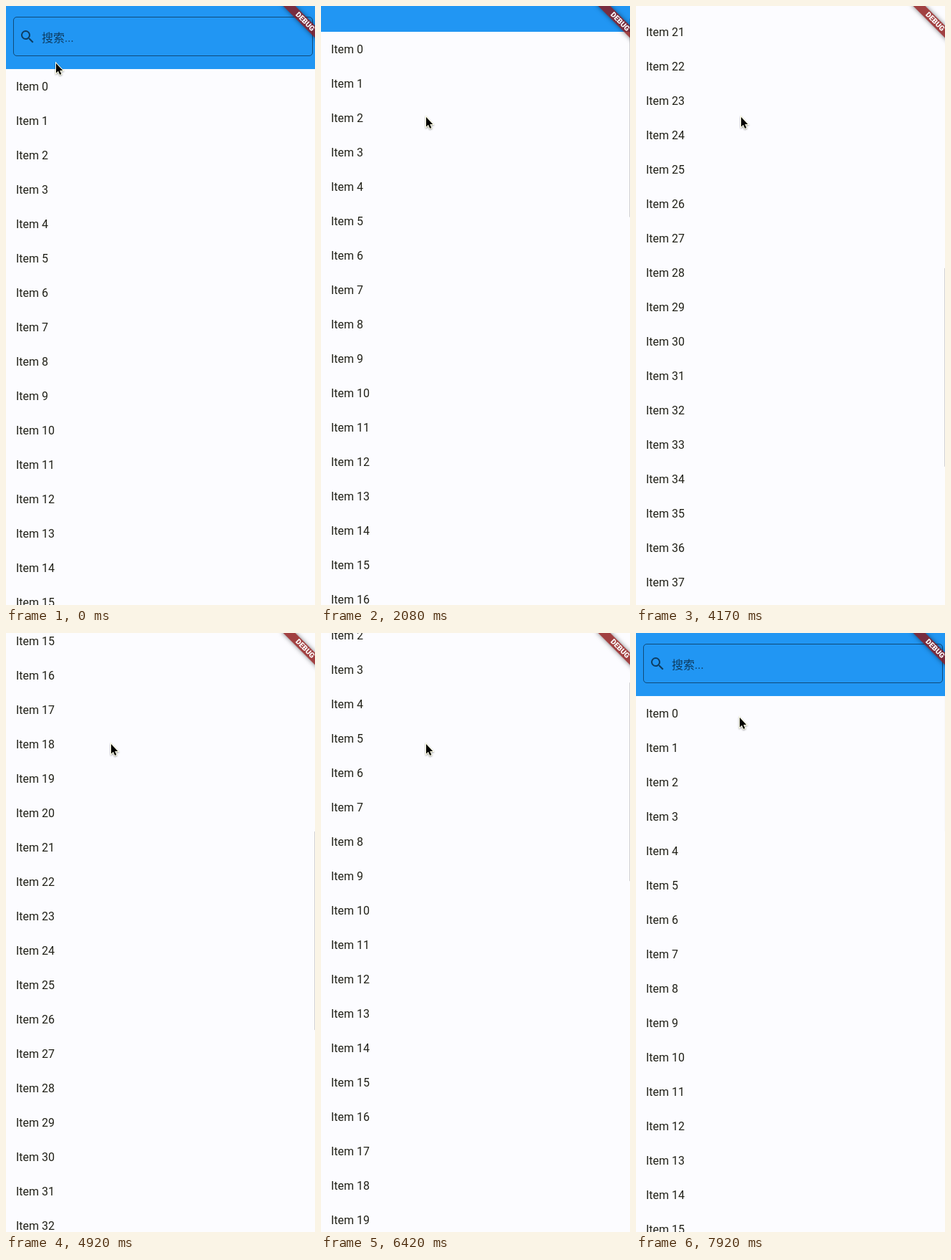
These frames come from a looping animation (432 px wide and 836 px high, 8 s). An HTML page:

```html
<!DOCTYPE html>
<html lang="zh">
<head>
<meta charset="utf-8">
<title>Collapsing search bar</title>
<style>
  html, body { margin: 0; width: 100%; height: 100%; overflow: hidden; background: #fcfcff; }
  #stage { position: relative; width: 432px; height: 836px; overflow: hidden;
    font: 16px Roboto, "Noto Sans CJK SC", "Noto Sans CJK", sans-serif; }
  #stage div, svg { position: absolute; }
  #list { top: 89px; left: 14px; color: #212118; will-change: transform; }
  #list p { margin: 0; height: 48px; line-height: 48px; white-space: nowrap; }
  #bar { top: 0; left: 0; width: 432px; overflow: hidden; background: #2196f3; }
  #search { left: 0; bottom: 0; width: 432px; height: 88px; color: rgba(0, 0, 0, .6); }
  #field { box-sizing: border-box; left: 10px; top: 15px; width: 419px; height: 55px;
    border: 1px solid rgba(0, 0, 0, .5); border-radius: 5px; }
  #hint { left: 50px; top: 33px; line-height: 24px; }
  #icon { left: 18px; top: 31px; fill: currentColor; }
  #banner { left: 377.5px; top: 16px; width: 80px; height: 12px; transform: rotate(45deg);
    background: rgba(141, 22, 22, .81); color: #fff; box-shadow: 0 0 6px rgba(0, 0, 0, .5);
    font-size: 10.2px; font-weight: 900; line-height: 12px; text-align: center; }
  #thumb { left: 431px; top: 0; width: 1px; height: 277px; background: rgba(0, 0, 0, .17); }
  #cursor { left: -4px; top: -4px; }
  #cursor path { stroke: #ffffe6; stroke-width: 2; paint-order: stroke;
    filter: drop-shadow(0 1px 1px rgba(0, 0, 0, .4)); }
</style>
</head>
<body>
<div id="stage">
  <div id="list"></div>
  <div id="bar">
    <div id="search">
      <div id="field"></div>
      <svg id="icon" width="24" height="24"><path d="M15.5 14h-.79l-.28-.27A6.47 6.47 0 0 0 16 9.5 6.5 6.5 0 1 0 9.5 16c1.61 0 3.09-.59 4.23-1.57l.27.28v.79l5 4.99L20.49 19zm-6 0C7.01 14 5 11.99 5 9.5S7.01 5 9.5 5 14 7.01 14 9.5 11.99 14 9.5 14z"/></svg>
      <div id="hint">搜索...</div>
    </div>
  </div>
  <div id="banner">DEBUG</div>
  <div id="thumb"></div>
  <svg id="cursor" width="22" height="28" viewBox="-4 -4 22 28">
    <path d="M0 0V13.5L3 10.7L5.2 15.8L7.4 14.9L5.2 9.9H9.3Z"/>
  </svg>
</div>
<script>
const LOOP = 8000, TICKS_PER_MS = 0.012, BAR = 88;
const el = id => document.getElementById(id);

// Progress 0..1 from start to end: speeds up over `ramp` ticks, cruises, slows down again.
function glide(tick, start, end, ramp) {
  const span = end - start;
  const t = Math.min(Math.max(tick - start, 0), span);
  const speed = 1 / (span - ramp);
  if (t < ramp) return speed * t * t / (2 * ramp);
  if (t > span - ramp) return 1 - speed * (span - t) ** 2 / (2 * ramp);
  return speed * (t - ramp / 2);
}

// Two short flicks and a long one down, then one steady scroll back to the top.
function scrollAt(tick) {
  const down = 48 * glide(tick, 16, 22, 3) + 73 * glide(tick, 24, 30, 3)
    + 974 * glide(tick, 32.5, 46, 6);
  return Math.round(down - 1095 * glide(tick, 48, 86, 6));
}

function pointerAt(tick) {
  const enter = glide(tick, 7, 11, 1), leave = glide(tick, 93, 95, 1);
  return [70 + 77 * enter - 2 * leave, 80 + 75 * enter - 37 * leave];
}

for (let i = 0; i < 50; i++) {
  const row = document.createElement('p');
  row.textContent = `Item ${i}`;
  el('list').append(row);
}

function draw(ms) {
  const tick = Math.floor((ms % LOOP) * TICKS_PER_MS + 0.05);
  const scroll = scrollAt(tick);
  const [x, y] = pointerAt(tick);
  const barHeight = Math.max(0, BAR - scroll);
  el('list').style.transform = `translateY(${-scroll}px)`;
  el('bar').style.height = `${barHeight}px`;
  el('search').style.opacity = Math.max(0, (barHeight - 40) / 48);
  el('thumb').style.transform = `translateY(${scroll * 0.3375}px)`;
  el('thumb').style.opacity = glide(tick, 13, 14, 0.5) - glide(tick, 93, 95.5, 1);
  el('cursor').style.transform = `translate(${x}px, ${y}px)`;
}

const start = performance.now();
function frame() {
  draw(performance.now() - start);
  requestAnimationFrame(frame);
}
frame();
</script>
</body>
</html>
```
